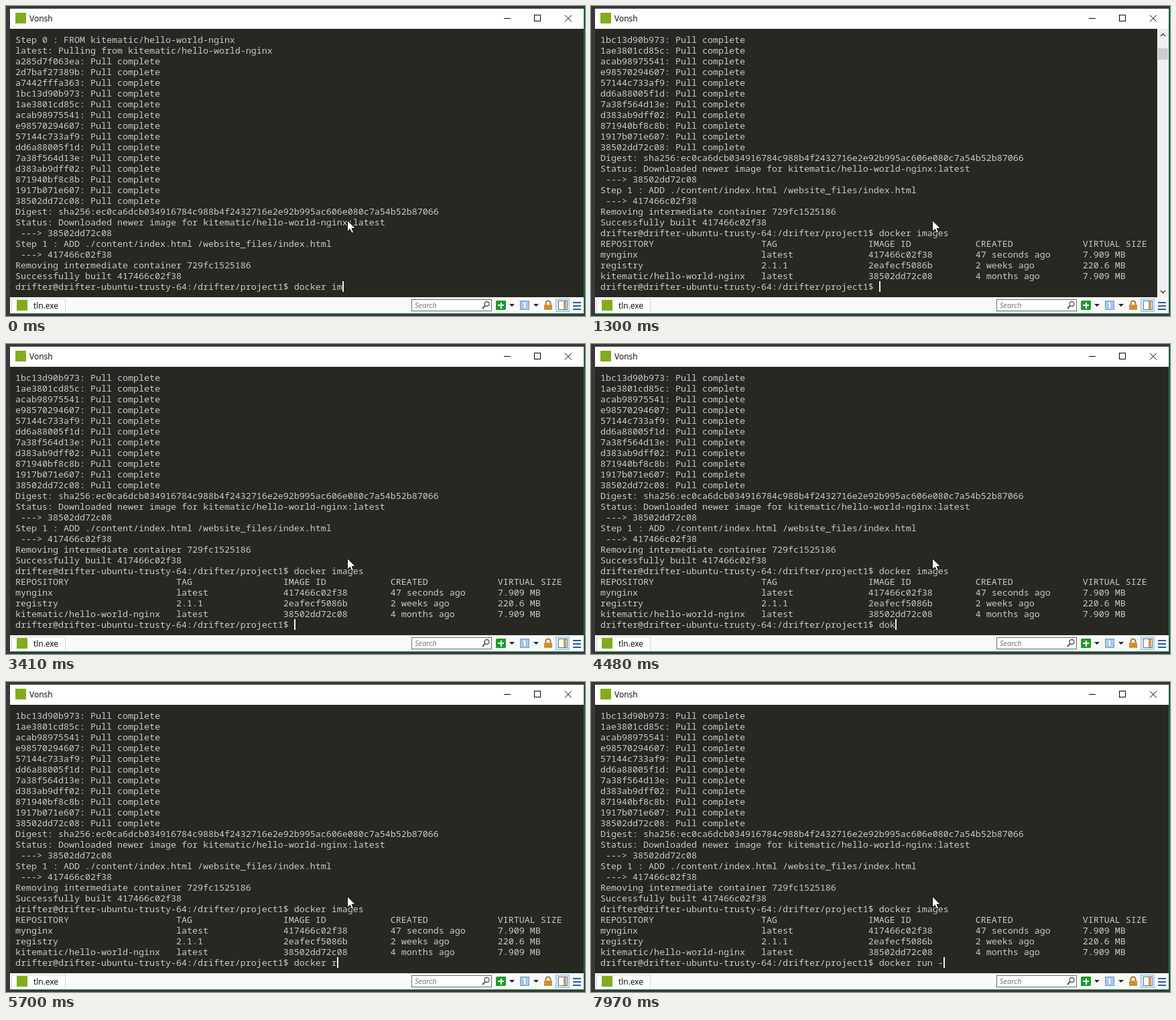
Recreate the animation shown at these times as an HTML page. Size 864 by 462 pixels, loop 8 s.

```html
<!DOCTYPE html>
<html lang="en">
<head>
<meta charset="utf-8">
<title>Terminal</title>
<style>
  html, body { margin: 0; width: 100%; height: 100%; overflow: hidden; background: #393939; }
  #stage { position: relative; width: 864px; height: 462px; overflow: hidden; }
  #stage > * { position: absolute; }
  svg { left: 0; top: 0; }
  svg text { font: 12px "Open Sans", "Noto Sans", sans-serif; fill: #000; }
  #screen {
    left: 14px; top: 42px; margin: 0; color: #cacac5;
    font: 13.3333px/16px "Noto Sans Mono", "DejaVu Sans Mono", monospace;
    font-variant-ligatures: none;
  }
  #caret { top: 410px; width: 2px; height: 16px; background: #f2f2ec; }
</style>
</head>
<body>
<div id="stage">
  <svg width="864" height="462" shape-rendering="crispEdges">
    <rect width="864" height="462" fill="#393939"/>
    <rect x="6" y="4" width="857" height="455" fill="#0f8a43"/>
    <rect x="6" y="4" width="856" height="30" fill="#fff"/>
    <rect x="6" y="34" width="856" height="400" fill="#272822"/>
    <rect x="6" y="434" width="856" height="24" fill="#f9f9f9"/>

    <rect x="14" y="10" width="16" height="16" fill="#82ac1c"/>
    <text x="35" y="23">Vonsh</text>
    <g fill="none" stroke="#000">
      <path d="M743 18.5h10M788.5 13.5h9v9h-9z"/>
      <path d="M834 13.5l10 10M844 13.5l-10 10" shape-rendering="auto"/>
    </g>

    <path d="M8.5 458V436.500H88.500V458" fill="#fff" stroke="#d5d5d5"/>
    <rect x="16" y="438" width="16" height="16" fill="#82ac1c"/>
    <text x="41" y="451">tln.exe</text>

    <rect x="605.5" y="437.500" width="119" height="17" fill="#fff" stroke="#6a6a6a"/>
    <text x="610" y="450" style="font-size:11px;font-style:italic;fill:#6d6d6d">Search</text>
    <g fill="none" stroke="#555" stroke-width="1.4" shape-rendering="auto">
      <circle cx="717.500" cy="444" r="3.500"/>
      <path d="M715 446.500l-4 4.500" stroke-width="2"/>
    </g>

    <rect x="731" y="439" width="15" height="14" rx="2" fill="#1f9a2c"/>
    <path d="M734 446h9M738.500 441.500v9" stroke="#fff" stroke-width="2"/>
    <path d="M751 444h8l-4 4zM787 444h8l-4 4z" fill="#222" shape-rendering="auto"/>
    <rect x="767.500" y="439.500" width="13" height="13" fill="#a9c8e8" stroke="#6d9bc8"/>
    <path d="M772 443h2v7" fill="none" stroke="#fff" stroke-width="2"/>
    <path d="M805.500 446v-3a3.500 3.500 0 0 1 7 0v3" fill="none" stroke="#a97a2c" stroke-width="2" shape-rendering="auto"/>
    <rect x="803" y="445" width="12" height="8" fill="#d99a3a"/>
    <path d="M803 447.500h12M803 450.500h12" stroke="#b87a22"/>
    <rect x="820.500" y="436.500" width="20" height="19" fill="#cfe6fa" stroke="#8fc3ee"/>
    <rect x="824.500" y="439.500" width="13" height="13" fill="#fff" stroke="#777"/>
    <path d="M834 440v12" stroke="#c39b63" stroke-width="4"/>
    <path d="M846 441.500h12M846 446.500h12M846 451.500h12" stroke="#2b5c9c" stroke-width="2"/>
  </svg>

  <pre id="screen"></pre>
  <div id="caret"></div>

  <svg width="864" height="462">
    <g id="scrollbar">
      <rect x="845" y="34" width="17" height="400" fill="#f0f0f0"/>
      <rect x="846" y="63" width="15" height="17" fill="#cdcdcd"/>
      <path d="M850 45l3.500-3.500 3.500 3.500M850 424l3.500 3.500 3.500-3.500" fill="none" stroke="#555" stroke-width="1.700"/>
    </g>
    <path d="M509.500 319.500v16.500l3.800-3.600 2.600 6 2.700-1.200-2.600-5.700h5.200z" fill="#fff" stroke="#111"/>
  </svg>
</div>

<script>
const LOOP = 8000, ROWS = 24, COL = 8, LEFT = 14;
const PROMPT = 'drifter@drifter-ubuntu-trusty-64:/drifter/project1$ ';
const layers = ('a285d7f063ea 2d7baf27389b a7442fffa363 1bc13d90b973 1ae3801cd85c ' +
  'acab98975541 e98570294607 57144c733af9 dd6a88005f1d 7a38f564d13e ' +
  'd383ab9dff02 871940bf8c8b 1917b071e607 38502dd72c08').split(' ');

const buildLog = [
  'Step 0 : FROM kitematic/hello-world-nginx',
  'latest: Pulling from kitematic/hello-world-nginx',
  ...layers.map(id => id + ': Pull complete'),
  'Digest: sha256:ec0ca6dcb034916784c988b4f2432716e2e92b995ac606e080c7a54b52b87066',
  'Status: Downloaded newer image for kitematic/hello-world-nginx:latest',
  ' ---> 38502dd72c08',
  'Step 1 : ADD ./content/index.html /website_files/index.html',
  ' ---> 417466c02f38',
  'Removing intermediate container 729fc1525186',
  'Successfully built 417466c02f38'
];

const row = (name, ...cells) => name.padEnd(30) + cells.map(c => c.padEnd(20)).join('').trimEnd();
const imageLog = [
  ...buildLog,
  PROMPT + 'docker images',
  row('REPOSITORY', 'TAG', 'IMAGE ID', 'CREATED', 'VIRTUAL SIZE'),
  row('mynginx', 'latest', '417466c02f38', '47 seconds ago', '7.909 MB'),
  row('registry', '2.1.1', '2eafecf5086b', '2 weeks ago', '220.6 MB'),
  row('kitematic/hello-world-nginx', 'latest', '38502dd72c08', '4 months ago', '7.909 MB')
];

// [start ms, typed command, caret visible]
const steps = [
  [0, 'docker im', 1], [130, 'docker ima', 1], [410, 'docker imag', 1],
  [560, 'docker image', 1], [710, 'docker images', 1], [1140, 'docker images', 0],
  [1300, '', 1], [1770, '', 0], [2290, '', 1], [2850, '', 0], [3410, '', 1],
  [3680, 'd', 1], [3800, 'do', 1], [3950, 'dokc', 1], [4480, 'dok', 1], [4600, 'do', 1],
  [4750, 'doc', 1], [4900, 'dock', 1], [5020, 'docker', 1], [5270, 'docker ', 1],
  [5700, 'docker r', 1], [5950, 'docker ru', 1], [6200, 'docker run', 1],
  [6350, 'docker run ', 1], [6850, 'docker run ', 0], [7380, 'docker run ', 1],
  [7970, 'docker run -', 1]
];
const RUN_AT = 1300, BAR_OFF = 2290;

const [screenEl, caret, scrollbar] = ['screen', 'caret', 'scrollbar'].map(id => document.getElementById(id));
let shown;

function draw() {
  const t = performance.now() % LOOP;
  const step = steps.findLast(s => s[0] <= t);
  if (step !== shown) {
    shown = step;
    const [start, typed, caretOn] = step;
    const line = PROMPT + typed;
    const log = start < RUN_AT ? buildLog : imageLog;
    screenEl.textContent = [...log, line].slice(-ROWS).join('\n');
    caret.style.left = LEFT + line.length * COL + 'px';
    caret.style.visibility = caretOn ? 'visible' : 'hidden';
    scrollbar.style.display = start >= RUN_AT && start < BAR_OFF ? '' : 'none';
  }
  requestAnimationFrame(draw);
}
draw();
</script>
</body>
</html>
```
